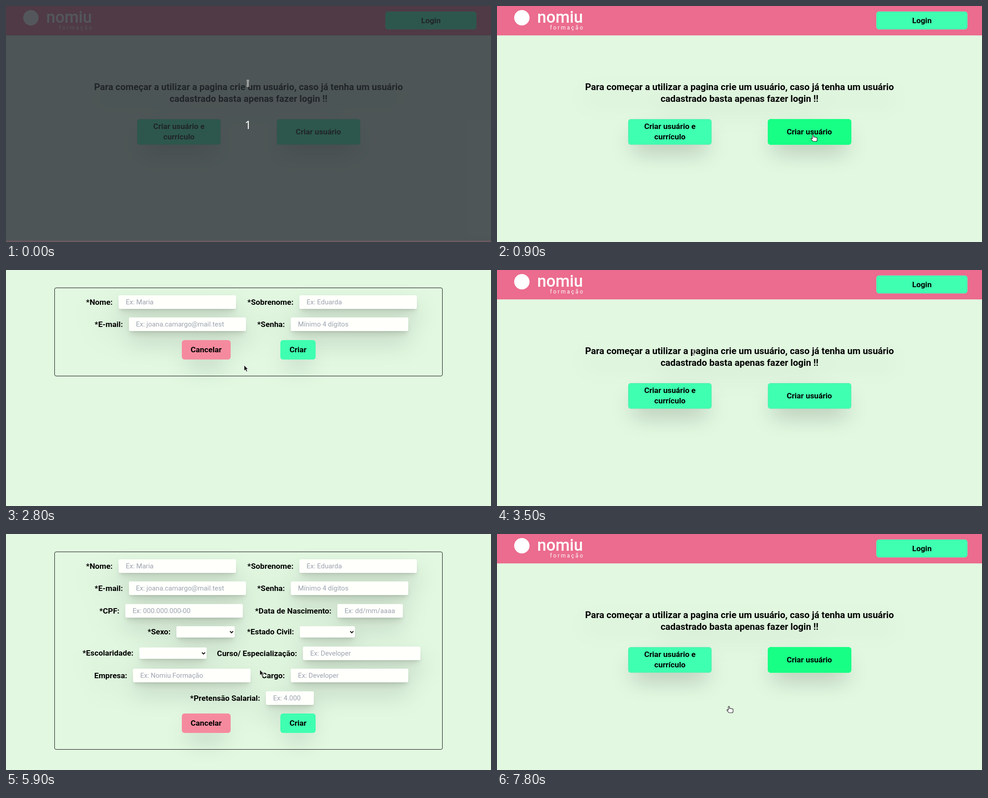
Recreate the animation shown at these times as an HTML page. Size 1073x522 px, loop 8000 ms.

```html
<!DOCTYPE html>
<html lang="pt-BR">
<head>
<meta charset="utf-8">
<title>Cadastro</title>
<style>
  html, body { margin: 0; width: 100%; height: 100%; overflow: hidden; background: #e2f8e1; }
  #stage { position: relative; width: 1073px; height: 522px; overflow: hidden; font: 700 17.25px Roboto, sans-serif; color: #000; }
  #stage div, #stage svg { position: absolute; box-sizing: border-box; white-space: nowrap; }
  .screen, #dim { inset: 0; }
  .bar { left: 0; width: 1073px; background: #eb6c8e; }
  .mark { left: 38px; top: 9px; width: 34px; height: 34px; border-radius: 50%; background: #fff; }
  .logo { color: #fff; right: 883px; }
  .title { left: 0; width: 1073px; top: 166px; font-size: 20.45px; line-height: 26px; text-align: center; filter: drop-shadow(0 25px 25px rgba(0, 0, 0, .15)); }
  .button { display: flex; align-items: center; justify-content: center; text-align: center; line-height: 23px; border-radius: 6px; background: #3fffb0; box-shadow: 0 25px 50px -12px rgba(0, 0, 0, .25); }
  .edged { border: 1px solid #6ee7b7; }
  .flat { box-shadow: none; }
  .button.hover { background: #17ff85; border-color: #17ff85; }
  .cancel { background: #f58a9e; }
  .cancel.hover { background: #ee3268; }
  .frame { left: 107px; top: 39px; width: 859px; border: 1px solid #111; border-radius: 4px; }
  .fields { inset: 0; filter: drop-shadow(0 25px 25px rgba(0, 0, 0, .15)); }
  .input { padding-left: 16px; border-radius: 3px; background: #fffffc; color: #9ca3af; font-size: 15px; font-weight: 400; box-shadow: 0 10px 15px -3px rgba(0, 0, 0, .1), 0 4px 6px -2px rgba(0, 0, 0, .1); }
  #dim { background: rgba(41, 45, 52, .8); }
  #count { left: 0; width: 1071px; top: 242px; text-align: center; color: #fff; font: 400 25px/40px "Noto Sans", sans-serif; }
  #cursor { left: 0; top: 0; overflow: visible; }
</style>
</head>
<body>
<div id="stage"></div>
<script>
const stage = document.getElementById('stage');
const px = (x, y, w, h) => `left:${x}px;top:${y}px;width:${w}px;height:${h}px`;

const button = (name, text, x, y, w, h, kind = '') =>
  `<div class="button ${kind}" data-name="${name}" style="${px(x, y, w, h)}">${text}</div>`;

const label = (text, x, y, h) =>
  `<div style="right:${1073 - x + 13}px;top:${y}px;line-height:${h}px">${text}</div>`;

const input = (text, x, y, w, hint) => label(text, x, y, 30) +
  `<div class="input" style="${px(x, y, w, 30)};line-height:30px">${hint}</div>`;

const select = (text, x, y, w) => label(text, x, y, 25) +
  `<div class="input" style="${px(x, y, w, 25)}"></div>
   <svg width="10" height="8" style="left:${x + w - 12}px;top:${y + 9}px">
     <path d="M1.5 2 5 5.5 8.5 2" fill="none" stroke="#111" stroke-width="2"/></svg>`;

const form = (name, height, fields) => `
  <div class="screen" id="${name}">
    <div class="frame" style="height:${height}px"></div>
    <div class="fields">${fields}</div>
    ${button('cancel', 'Cancelar', 388.5, height - 41, 108.5, 43, 'cancel')}
    ${button('create', 'Criar', 607, height - 41, 78, 43)}
  </div>`;

const account =
  input('*Nome:', 249, 56, 259.5, 'Ex: Maria') +
  input('*Sobrenome:', 649, 56, 259.5, 'Ex: Eduarda') +
  input('*E-mail:', 271.5, 105.4, 259.5, 'Ex: joana.camargo@mail.test') +
  input('*Senha:', 630, 105.4, 259.5, 'Mínimo 4 dígitos');

const resume =
  input('*CPF:', 264, 154.8, 259.5, 'Ex: 000.000.000-00') +
  input('*Data de Nascimento:', 733, 154.8, 145, 'Ex: dd/mm/aaaa') +
  select('*Sexo:', 377, 204, 129) +
  select('*Estado Civil:', 650, 204, 122) +
  select('*Escolaridade:', 295, 251, 149) +
  input('Curso/ Especialização:', 657, 248.6, 259.5, 'Ex: Developer') +
  input('Empresa:', 281, 298, 259.5, 'Ex: Nomiu Formação') +
  input('Cargo:', 630, 298, 259.5, 'Ex: Developer') +
  input('*Pretensão Salarial:', 575, 347.5, 105.5, 'Ex: 4.000');

const beamPath = 'M-2.5-6H-1Q0-6 0-5V5Q0 6-1 6H-2.5M2.5-6H1Q0-6 0-5M0 5Q0 6 1 6H2.5';

stage.innerHTML = `
  <div class="screen" id="home">
    <div class="bar" style="top:0;height:65px"></div>
    <div class="mark"></div>
    <div class="logo" style="top:4px;font-size:36px;font-weight:500;line-height:42px">nomiu</div>
    <div class="logo" style="top:39px;font-size:12px;font-weight:400;line-height:18px;letter-spacing:3px;margin-right:-3px">formação</div>
    ${button('login', 'Login', 839, 12, 202, 40, 'edged flat')}
    <div class="title">Para começar a utilizar a pagina crie um usuário, caso já tenha um usuário<br>cadastrado basta apenas fazer login !!</div>
    ${button('both', 'Criar usuário e<br>currículo', 290, 249.5, 185, 57, 'edged')}
    ${button('user', 'Criar usuário', 598.5, 249.5, 185, 57, 'edged')}
  </div>
  ${form('short', 196, account)}
  ${form('full', 438, account + resume)}
  <div id="dim"><div class="bar" style="top:519px;height:3px;opacity:.2"></div><div id="count">1</div></div>
  <svg id="cursor" width="1" height="1">
    <path id="arrow" d="M0 0V13L3 10.3 5.2 15 7.6 13.9 5.5 9.3H9.3Z" fill="#1c1c1c" stroke="#fff"/>
    <g id="beam" fill="none"><path d="${beamPath}" stroke="#fff" stroke-width="3"/><path d="${beamPath}" stroke="#333"/></g>
    <path id="hand" d="M-1.3 8.5V1.2Q-1.3 0 0 0T1.4 1.2V5Q3.4 4 4.2 5.3 6 4.5 6.8 5.8 9.3 5.2 9.3 7.5V11Q9.3 14.5 7 14.5H1.5Q0 14.5-1 13L-4.2 9.3Q-4.7 7.8-3 7.6Z" fill="#fff" stroke="#222" stroke-width="1.2"/>
  </svg>`;

// time, x, y, cursor shape, hovered button
const keys = [
  [0, 535, 171, 'beam'], [200, 535, 171, 'beam'], [500, 578, 219, 'arrow'],
  [700, 650, 256, 'hand', 'user'], [900, 699, 285, 'hand', 'user'],
  [1400, 699, 285, 'arrow'], [2100, 699, 285, 'arrow'], [2200, 698, 285, 'arrow'],
  [2300, 698, 285, 'arrow'], [2500, 680, 277, 'arrow'], [2600, 680, 277, 'arrow'],
  [2900, 450, 177, 'hand', 'cancel'], [3300, 450, 177, 'hand', 'cancel'],
  [3400, 449, 178, 'beam'], [3500, 435, 182, 'beam'], [3800, 430, 222, 'arrow'],
  [4000, 421, 258, 'hand', 'both'], [4200, 415, 285, 'hand', 'both'],
  [4300, 416, 286, 'hand', 'both'], [4500, 416, 286, 'arrow'],
  [5300, 608, 140, 'arrow'], [5400, 608, 140, 'arrow'], [6300, 524, 428, 'arrow'],
  [6600, 492, 432, 'hand', 'cancel'], [7000, 448, 425, 'hand', 'cancel'],
  [7500, 447, 426, 'arrow'], [7700, 447, 426, 'arrow'], [7800, 513, 381, 'hand', 'user']
];
const screens = [[0, 'home'], [1400, 'short'], [3400, 'home'], [4500, 'full'], [7500, 'home']];

const byId = id => document.getElementById(id);
const show = (id, on) => byId(id).style.display = on ? '' : 'none';
const buttons = [...document.querySelectorAll('.button')];

function draw(t) {
  const i = keys.findLastIndex(k => k[0] <= t);
  const [t0, x0, y0, shape, hovered] = keys[i];
  const [t1, x1, y1] = keys[i + 1] || [8000, x0, y0];
  const f = (t - t0) / (t1 - t0);
  const screen = screens.findLast(s => s[0] <= t)[1];

  for (const id of ['home', 'short', 'full']) show(id, id === screen);
  for (const id of ['arrow', 'beam', 'hand']) show(id, id === shape);
  show('dim', t < 200);
  for (const b of buttons) b.classList.toggle('hover', b.dataset.name === hovered);
  byId('cursor').style.transform = `translate(${x0 + (x1 - x0) * f}px, ${y0 + (y1 - y0) * f}px)`;
}

function tick() {
  draw(Math.floor(performance.now() % 8000 / 100) * 100);
  requestAnimationFrame(tick);
}
tick();
</script>
</body>
</html>
```
